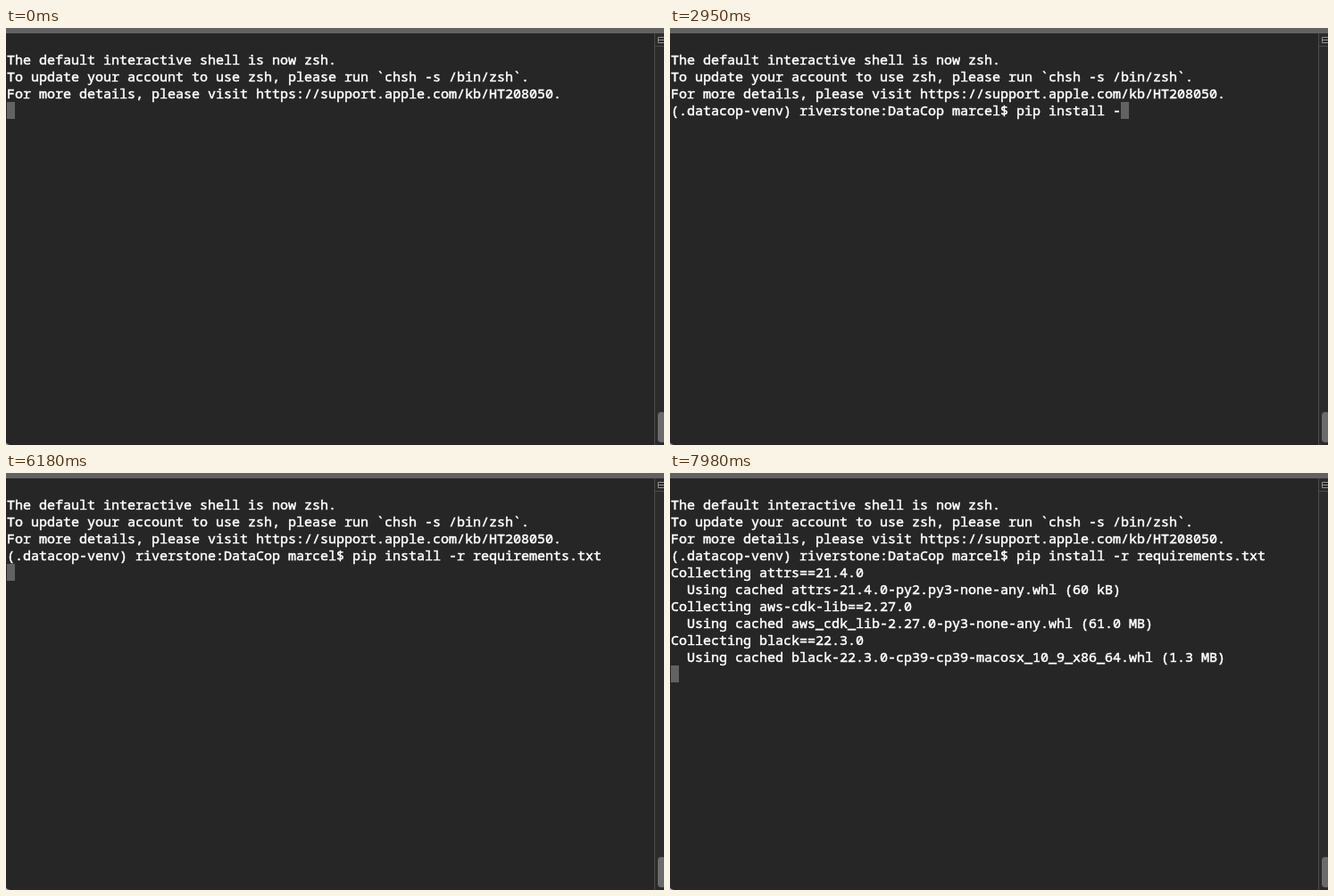
Write an HTML page that moves like this. It is 737x468 px and loops after 8000 ms.

```html
<!DOCTYPE html>
<html lang="en">
<head>
<meta charset="utf-8">
<title>Terminal</title>
<style>
html, body { margin: 0; width: 100%; height: 100%; overflow: hidden; background: #262626; }
svg { display: block; }
text {
  font: 15px "Noto Sans Mono", "DejaVu Sans Mono", monospace;
  font-variant-ligatures: none;
  white-space: pre;
  fill: #fff;
  stroke: #fff;
  stroke-width: 0.5px;
}
</style>
</head>
<body>
<svg width="737" height="468" viewBox="0 0 737 468">
  <rect width="737" height="468" fill="#262626"/>
  <rect width="737" height="6" fill="#626262"/>
  <g id="scrollbar">
    <rect x="726" y="6" width="11" height="462" fill="#2b2b2b"/>
    <rect x="726" y="6" width="1" height="462" fill="#4b4b4b"/>
    <rect x="727" y="20" width="10" height="1" fill="#4b4b4b"/>
    <path d="M738 10.5H730.5V16.5H738M730.5 13.5H738" fill="none" stroke="#929292"/>
    <rect x="730" y="431" width="9" height="34" rx="4" fill="#6b6b6b"/>
  </g>
  <path d="M0 465Q1 467.5 5 468H0Z" fill="#aaa"/>
  <rect id="cursor" width="9" height="19" fill="#626262"/>
  <g id="screen"></g>
</svg>
<script>
const LOOP = 8000, CELL = 9, ROW = 19, LEFT = 1, TOP = 26;
const intro = [
  "The default interactive shell is now zsh.",
  "To update your account to use zsh, please run `chsh -s /bin/zsh`.",
  "For more details, please visit https://support.apple.com/kb/HT208050."
];
const prompt = "(.datacop-venv) riverstone:DataCop marcel$ ";
const output = [
  "Collecting attrs==21.4.0",
  "  Using cached attrs-21.4.0-py2.py3-none-any.whl (60 kB)",
  "Collecting aws-cdk-lib==2.27.0",
  "  Using cached aws_cdk_lib-2.27.0-py3-none-any.whl (61.0 MB)",
  "Collecting black==22.3.0",
  "  Using cached black-22.3.0-cp39-cp39-macosx_10_9_x86_64.whl (1.3 MB)"
];
const printed = [7060, 7090, 7230, 7560, 7960, 7980];
const ENTER = 6180;

// [first key, last key, keys]; "<" is backspace
const bursts = [
  [500, 500, "p"],
  [700, 820, "ip "],
  [960, 1300, "instal"],
  [1440, 1490, "l "],
  [1630, 1700, "-t"],
  [2350, 2400, "<t"],
  [2950, 2950, "<"],
  [3410, 3410, "t"],
  [3700, 3700, "<"],
  [4250, 4320, "r "],
  [4580, 4580, "t"],
  [4990, 5140, "<re"]
];
const COMPLETE = 5380;

const cursor = document.getElementById("cursor");
const screen = document.getElementById("screen");
const rows = Array.from({ length: 10 }, (_, i) => {
  const row = document.createElementNS("http://www.w3.org/2000/svg", "text");
  row.setAttribute("x", LEFT);
  row.setAttribute("y", TOP + i * ROW + 15);
  return screen.appendChild(row);
});

function command(t) {
  let text = "";
  for (const [from, to, keys] of bursts) {
    const gap = (to - from) / Math.max(1, keys.length - 1);
    [...keys].forEach((key, i) => {
      if (t < from + i * gap) return;
      text = key === "<" ? text.slice(0, -1) : text + key;
    });
  }
  return t < COMPLETE ? text : text + "quirements.txt ";
}

function linesAt(t) {
  const lines = [...intro, t < 500 ? "" : prompt + command(t)];
  if (t >= ENTER) lines.push(...output.filter((_, i) => t >= printed[i]), "");
  return lines;
}

function draw(t) {
  const lines = linesAt(t);
  rows.forEach((row, i) => {
    const line = lines[i] || "";
    if (row.textContent !== line) row.textContent = line;
  });
  const last = lines.length - 1;
  cursor.setAttribute("x", LEFT + lines[last].length * CELL);
  cursor.setAttribute("y", TOP + last * ROW);
}

let start;
function tick(now) {
  start ??= now;
  draw((now - start) % LOOP);
  requestAnimationFrame(tick);
}
draw(0);
requestAnimationFrame(tick);
</script>
</body>
</html>
```
